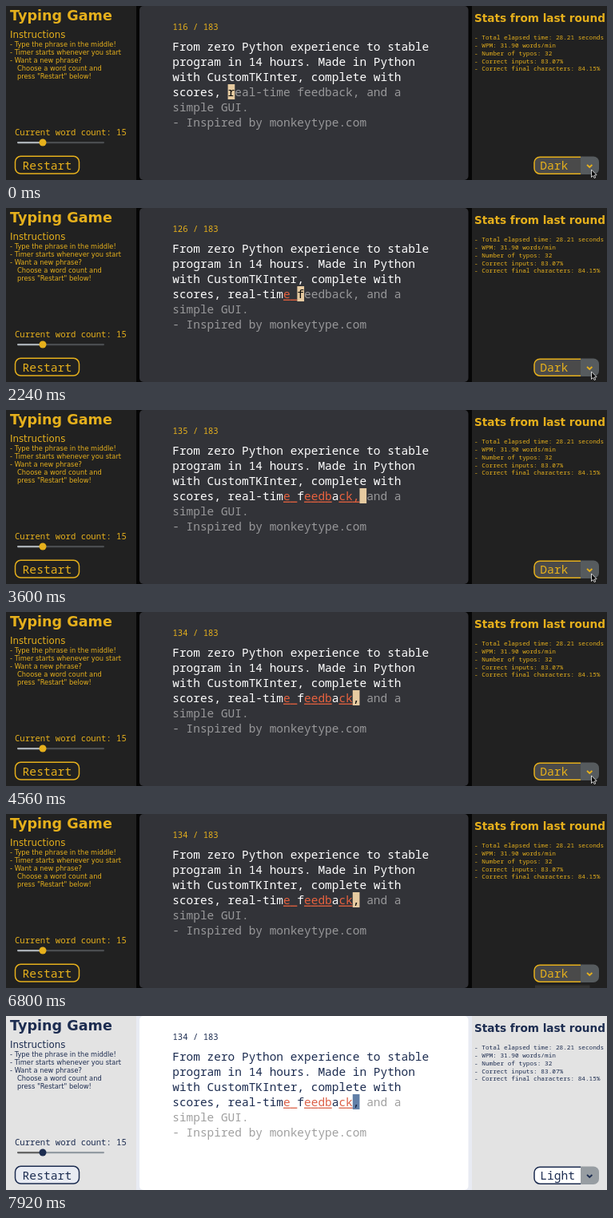
An HTML page with a canvas that plays this animation: 752x218 px, repeating every 8 s.

```html
<!DOCTYPE html>
<html lang="en">
<head>
<meta charset="utf-8">
<title>Typing game</title>
<style>
html, body { margin: 0; width: 752px; height: 218px; overflow: hidden; }
canvas { display: block; }
</style>
</head>
<body>
<canvas id="stage" width="752" height="218"></canvas>
<script>
const ctx = document.getElementById('stage').getContext('2d');
const LOOP = 8000, STEP = 80;
const KEY_START = 720, KEY_GAP = 151, BACKSPACE = 4080;
const MENU_OPEN = 5920, CURSOR_LEAVE = 6160, THEME_SWITCH = 7120, REDRAWN = 7360;
const MONO = '"Noto Sans Mono", "DejaVu Sans Mono", monospace';
const SANS = '"DejaVu Sans", sans-serif';
const BODY_SIZE = 14.46, ADVANCE = BODY_SIZE * 0.6;

const DARK = {
  back: '#060606', side: '#212121', page: '#323338', accent: '#e6b01c',
  typed: '#ffffff', dim: '#98989a', wrong: '#e8623f', caret: '#e6caa0', caretText: '#080808',
  sliderOn: '#aab0b5', sliderOff: '#4a4d50', button: '#212121', combo: '#4a4a4a', arrow: '#565b5e', name: 'Dark'
};
const LIGHT = {
  back: '#e8ebf3', side: '#e3e3e3', page: '#ffffff', accent: '#1c2c50',
  typed: '#1c2c50', dim: '#a0a0a0', wrong: '#dc6148', caret: '#6280a8', caretText: '#14203c',
  sliderOn: '#666666', sliderOff: '#939ba2', button: '#e8ebf3', combo: '#ffffff', arrow: '#979da2', name: 'Light'
};

const PHRASE = [
  'From zero Python experience to stable',
  'program in 14 hours. Made in Python',
  'with CustomTKInter, complete with',
  'scores, real-time feedback, and a',
  'simple GUI.',
  '- Inspired by monkeytype.com'
];
const WRONG = new Set([124, 125, 127, 128, 129, 130, 132, 133, 134]);
const HELP = [
  ['- Type the phrase in the middle!', 5],
  ['- Timer starts whenever you start', 5],
  ['- Want a new phrase?', 5],
  ['Choose a word count and', 14],
  ['press "Restart" below!', 14]
];
const STATS = [
  '- Total elapsed time: 28.21 seconds',
  '- WPM: 31.90 words/min',
  '- Number of typos: 32',
  '- Correct inputs: 83.07%',
  '- Correct final characters: 84.15%'
];

function text(str, x, y, size, color, family = MONO, weight = 400) {
  ctx.font = `${weight} ${size}px ${family}`;
  ctx.fillStyle = color;
  ctx.fillText(str, x, y);
}

function rect(x, y, w, h, color) {
  ctx.fillStyle = color;
  ctx.fillRect(x, y, w, h);
}

function round(x, y, w, h, radius, fill, stroke) {
  ctx.beginPath();
  ctx.roundRect(x, y, w, h, radius);
  ctx.fillStyle = fill;
  ctx.fill();
  if (stroke) {
    ctx.strokeStyle = stroke;
    ctx.lineWidth = 1.5;
    ctx.stroke();
  }
}

function drawLeft(c) {
  rect(0, 0, 163, 218, c.side);
  text('Typing Game', 5, 18, 17.6, c.accent, SANS, 700);
  text('Instructions', 5, 40, 11.8, c.accent, SANS);
  HELP.forEach(([line, x], i) => text(line, x, 51 + i * 9.9, 8.3, c.accent, SANS));
  text('Current word count: 15', 11, 162, 10.6, c.accent);
  round(14, 169.9, 109, 2.4, 1.2, c.sliderOff);
  round(14, 169.9, 32, 2.4, 1.2, c.sliderOn);
  round(41.5, 166.5, 9, 9, 4.5, c.accent);
  round(11.5, 188.3, 80, 21.7, 7, c.button, c.accent);
  text('Restart', 20.5, 205, 14.7, c.accent);
}

function drawPhrase(c, count) {
  round(167, 0, 411.5, 218, 5, c.page);
  text(`${count} / 183`, 208.5, 30, 10.6, c.accent);
  let index = 0;
  PHRASE.forEach((line, row) => {
    const y = 56 + row * 19;
    [...line, ' '].forEach((ch, col) => {
      const x = 208.2 + col * ADVANCE;
      const bad = index < count && WRONG.has(index);
      let color = index < count ? c.typed : c.dim;
      if (bad) {
        color = c.wrong;
        rect(x, y + 1.6, ADVANCE, 1.3, color);
      }
      if (index === count) {
        rect(x, y - 15, ADVANCE, 19, c.caret);
        color = c.caretText;
      }
      text(ch, x, y, BODY_SIZE, color);
      index++;
    });
  });
}

function drawCombo(c) {
  round(719, 188.5, 23, 22.5, [0, 7, 7, 0], c.arrow);
  round(661, 189.2, 58, 21, [7, 0, 0, 7], c.combo);
  ctx.beginPath();
  ctx.moveTo(719, 189.2);
  ctx.arcTo(661, 189.2, 661, 200, 7);
  ctx.arcTo(661, 210.2, 719, 210.2, 7);
  ctx.lineTo(719, 210.2);
  ctx.strokeStyle = c.accent;
  ctx.lineWidth = 1.5;
  ctx.stroke();
  text(c.name, 668.2, 205, 14.6, c.accent);
  ctx.beginPath();
  ctx.moveTo(727, 199);
  ctx.lineTo(730.2, 202);
  ctx.lineTo(733.4, 199);
  ctx.lineWidth = 1.8;
  ctx.stroke();
}

function drawRight(c) {
  rect(583, 0, 169, 218, c.side);
  text('Stats from last round', 586, 20, 13.6, c.accent, SANS, 700);
  STATS.forEach((line, i) => text(line, 586, 42.4 + i * 9.75, 7.72, c.accent));
  drawCombo(c);
}

function drawCursor(t) {
  const k = Math.min(1, Math.max(0, (t - CURSOR_LEAVE) / 320));
  ctx.save();
  ctx.translate(732.5 - 20 * k, 205 + 18 * k);
  ctx.beginPath();
  [[0, 0], [0, 9.5], [2.2, 7.5], [3.7, 10.6], [5.2, 9.9], [3.8, 6.9], [6.6, 6.7]]
    .forEach(([x, y]) => ctx.lineTo(x, y));
  ctx.closePath();
  ctx.fillStyle = '#000000';
  ctx.fill();
  ctx.strokeStyle = '#ffffff';
  ctx.lineWidth = 0.8;
  ctx.stroke();
  ctx.restore();
}

function typedCount(t) {
  if (t >= BACKSPACE) return 134;
  const keys = Math.floor((t - KEY_START) / KEY_GAP);
  return 116 + Math.min(19, Math.max(0, keys));
}

function draw(t) {
  const c = t < THEME_SWITCH ? DARK : LIGHT;
  rect(0, 0, 752, 218, c.back);
  if (t < THEME_SWITCH || t >= REDRAWN) {
    drawLeft(c);
    drawPhrase(c, typedCount(t));
    drawRight(c);
  }
  if (t >= MENU_OPEN && t < THEME_SWITCH + STEP) {
    rect(662, 214.5, 68.5, 4, c === DARK ? '#333333' : '#9da0a4');
  }
  if (t < THEME_SWITCH) drawCursor(t);
}

const start = performance.now();
function tick() {
  const t = (performance.now() - start) % LOOP;
  draw(Math.floor(t / STEP) * STEP);
  requestAnimationFrame(tick);
}
tick();
</script>
</body>
</html>
```
